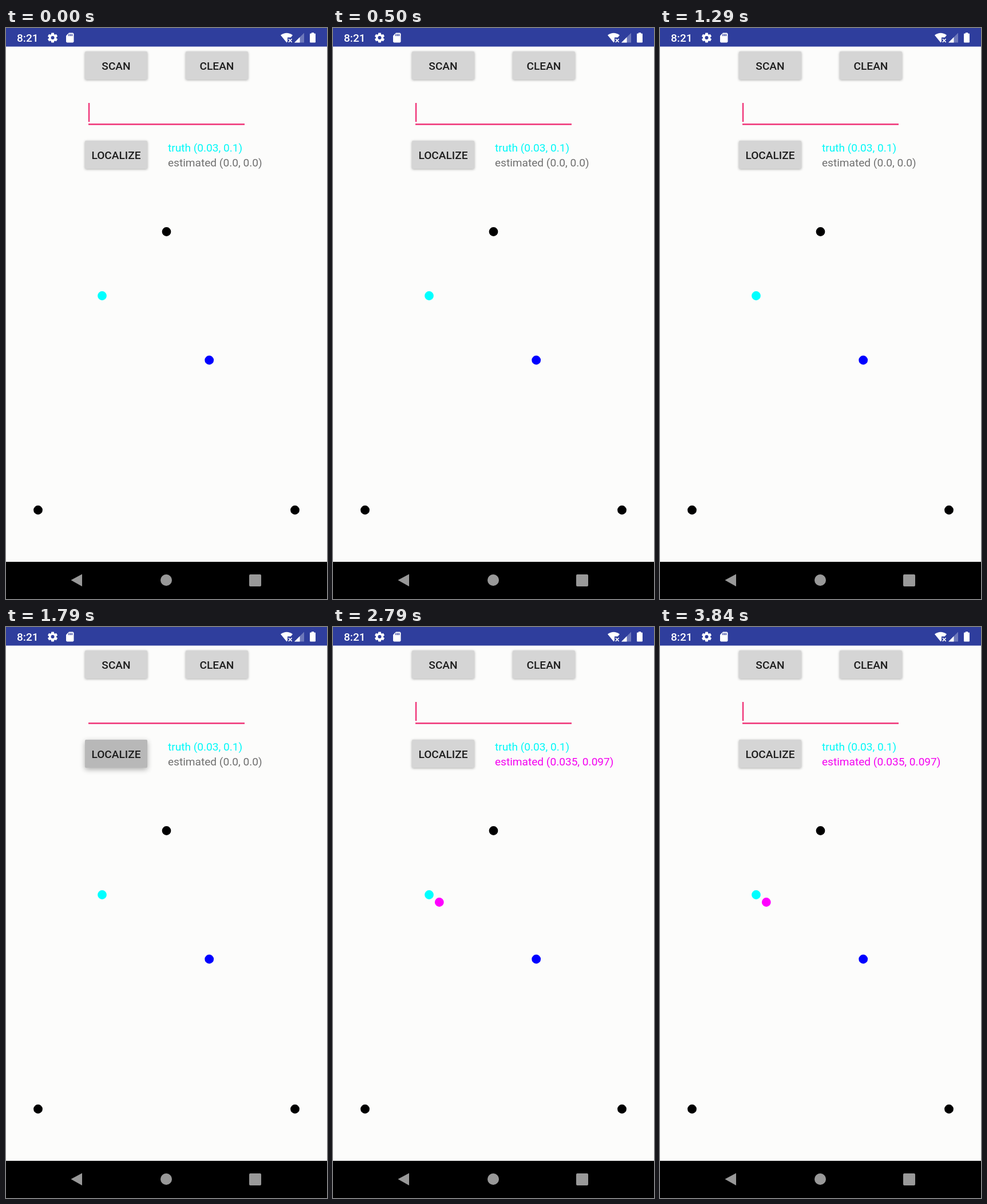
An HTML page with a canvas that plays this animation: 561 px wide and 998 px high, repeating every 3890 ms.

```html
<!DOCTYPE html>
<html lang="en">
<head>
<meta charset="utf-8">
<title>Localize</title>
<style>
html, body { margin: 0; width: 100%; height: 100%; overflow: hidden; background: #fcfcfb; }
canvas { display: block; width: 561px; height: 998px; }
</style>
</head>
<body>
<canvas id="stage" width="561" height="998"></canvas>
<script>
const ctx = document.getElementById('stage').getContext('2d');
const LOOP = 3890;
const PRESS = 1790, RELEASE = 1960, SETTLED = 2200, RESULT = 2060;
const CURSOR_OFF = 1590, CURSOR_ON = 2290;
const BAR = '#2f3e9d';

const mix = (a, b, k) => a + (b - a) * k;

function rect(x, y, w, h, color) {
  ctx.fillStyle = color;
  ctx.fillRect(x, y, w, h);
}

function round(x, y, w, h, r, color) {
  ctx.fillStyle = color;
  ctx.beginPath();
  ctx.roundRect(x, y, w, h, r);
  ctx.fill();
}

function dot(x, y, r, color) {
  ctx.fillStyle = color;
  ctx.beginPath();
  ctx.arc(x, y, r, 0, Math.PI * 2);
  ctx.fill();
}

function poly(points, color) {
  ctx.fillStyle = color;
  ctx.beginPath();
  points.forEach(([x, y]) => ctx.lineTo(x, y));
  ctx.closePath();
  ctx.fill();
}

function text(str, x, y, color, weight = 400, align = 'left') {
  ctx.font = `${weight} 19.1px Roboto, sans-serif`;
  ctx.textAlign = align;
  ctx.fillStyle = color;
  ctx.fillText(str, x, y);
}

function button(label, x, y, press = 0) {
  const g = Math.round(mix(213, 184, press));
  ctx.save();
  ctx.shadowColor = 'rgba(0,0,0,.32)';
  ctx.shadowBlur = mix(4, 10, press);
  ctx.shadowOffsetY = mix(1, 3, press);
  round(x, y, 109, 49, 2, `rgb(${g},${g},${g})`);
  ctx.restore();
  text(label, x + 54.5, y + 32, '#1c1c1c', 500, 'center');
}

function gear(x, y) {
  ctx.save();
  ctx.translate(x, y);
  for (let i = 0; i < 6; i++) {
    poly([[-2.2, -8.6], [2.2, -8.6], [3, -4], [-3, -4]], '#fff');
    ctx.rotate(Math.PI / 3);
  }
  dot(0, 0, 6.6, '#fff');
  dot(0, 0, 3, BAR);
  ctx.restore();
}

function card() {
  poly([[110, 8.5], [117, 8.5], [118.5, 10], [118.5, 24], [117, 25.5],
    [106.5, 25.5], [105, 24], [105, 13.5]], '#fff');
  for (let i = 0; i < 3; i++) rect(109.3 + i * 2.7, 10.5, 1.5, 3.6, BAR);
}

function wifi() {
  ctx.fillStyle = '#fff';
  ctx.beginPath();
  ctx.moveTo(490.5, 25.5);
  ctx.lineTo(480, 12.5);
  ctx.quadraticCurveTo(490.5, 5, 501, 12.5);
  ctx.closePath();
  ctx.fill();
  rect(492, 16.5, 10, 10, BAR);
  ctx.strokeStyle = '#fff';
  ctx.lineWidth = 1.7;
  ctx.beginPath();
  ctx.moveTo(493.8, 19);
  ctx.lineTo(499.6, 24.8);
  ctx.moveTo(499.6, 19);
  ctx.lineTo(493.8, 24.8);
  ctx.stroke();
}

function statusBar() {
  rect(0, 0, 561, 32.5, BAR);
  text('8:21', 19, 24, '#fff', 500);
  gear(81.5, 17);
  card();
  wifi();
  poly([[504, 25.5], [521, 8.5], [521, 25.5]], 'rgba(255,255,255,.3)');
  poly([[504, 25.5], [513.5, 16], [513.5, 25.5]], '#fff');
  round(531, 9.5, 10, 16, 1.3, '#fff');
  rect(534, 8, 4, 2, '#fff');
}

function navBar() {
  rect(0, 933, 561, 65, '#000');
  poly([[113.5, 965], [133, 954.5], [133, 976]], '#999');
  dot(280, 965, 10, '#999');
  round(425, 955, 21, 21, 2, '#999');
}

function pressAt(t) {
  if (t < PRESS || t >= SETTLED) return 0;
  return t < RELEASE ? 1 : 1 - (t - RELEASE) / (SETTLED - RELEASE);
}

function draw(t) {
  const found = t >= RESULT;
  rect(0, 0, 561, 998, '#fcfcfb');
  statusBar();
  button('SCAN', 138, 41);
  button('CLEAN', 314, 41);
  button('LOCALIZE', 138, 197, pressAt(t));

  rect(144, 167, 273, 2.6, '#f0387a');
  if (t < CURSOR_OFF || t >= CURSOR_ON) rect(143.8, 131, 2.5, 33, '#f0387a');

  text('truth (0.03, 0.1)', 283, 216, '#00f8f8');
  text(found ? 'estimated (0.035, 0.097)' : 'estimated (0.0, 0.0)', 283, 242,
    found ? '#f400f0' : '#707070');

  dot(280.5, 356, 7.9, '#000');
  dot(56, 842.5, 7.9, '#000');
  dot(505, 842.5, 7.9, '#000');
  dot(168, 468, 7.9, '#00ffff');
  dot(355.2, 580.5, 7.9, '#0000ff');
  if (found) dot(185.8, 481, 7.9, '#ff00ff');
  navBar();
}

const start = performance.now();
function tick() {
  draw((performance.now() - start) % LOOP);
  requestAnimationFrame(tick);
}
tick();
</script>
</body>
</html>
```
